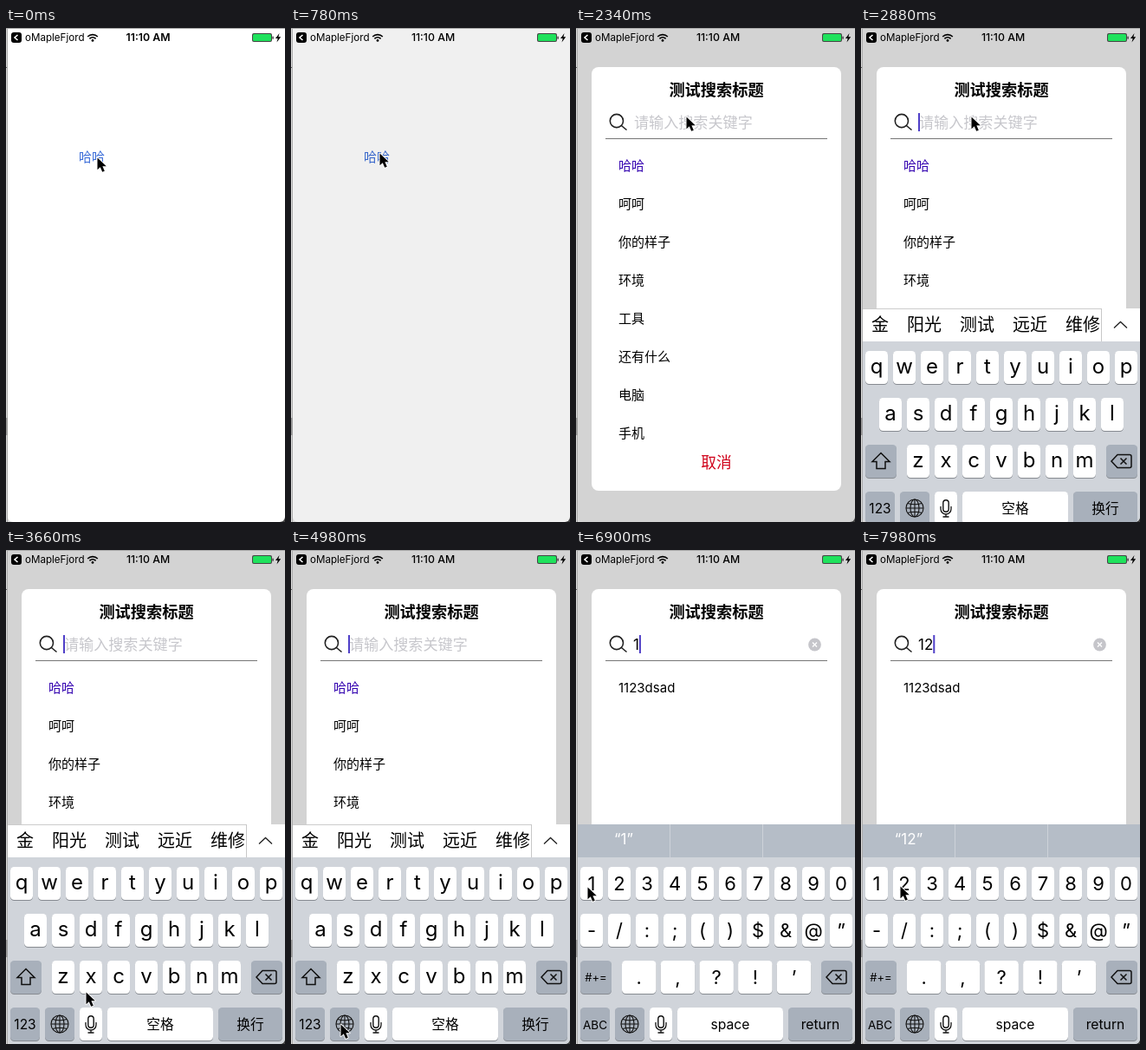
Animation of 322 by 569 pixels, one loop 8000 ms. Source, as an HTML page with a canvas:

```html
<!DOCTYPE html>
<html lang="zh">
<head>
<meta charset="utf-8">
<style>
  html, body { margin: 0; width: 100%; height: 100%; overflow: hidden; }
  canvas { display: block; width: 322px; height: 569px; }
</style>
</head>
<body>
<canvas></canvas>
<script>
const W = 322, H = 569, LOOP = 8000, STEP = 60;
const FONT = 'Inter, "Noto Sans CJK SC", "Noto Sans CJK", sans-serif';
const KEYBOARD_TOP = 316;
const ITEMS = ['哈哈', '呵呵', '你的样子', '环境', '工具', '还有什么', '电脑', '手机'];

// Moments when the state changes, in ms
const OPEN = 780, FOCUS = 2520, ENGLISH = 5040, NUMBERS = 5580, TYPE_1 = 6780, TYPE_2 = 7800;

// Pointer path: time, x, y
const POINTER = [
  [60, 105, 149], [180, 102, 144], [1560, 102, 144], [1920, 146, 243], [2340, 127, 102],
  [3240, 127, 102], [3420, 150, 290], [3660, 92, 509], [4020, 28, 549], [4200, 28, 549],
  [4560, 57, 546], [5100, 57, 546], [5400, 30, 548], [5940, 30, 548], [6600, 13, 388],
  [7440, 13, 388], [7560, 30, 440], [7740, 45, 387]
];

const canvas = document.querySelector('canvas');
const ctx = canvas.getContext('2d');
const ratio = window.devicePixelRatio || 1;
canvas.width = W * ratio;
canvas.height = H * ratio;

const clamp = v => Math.max(0, Math.min(1, v));
const smooth = v => { v = clamp(v); return v * v * (3 - 2 * v); };

function rect(x, y, w, h, color, radius = 0) {
  ctx.fillStyle = color;
  ctx.beginPath();
  ctx.roundRect(x, y, w, h, radius);
  ctx.fill();
}

function text(str, x, y, size, color = '#000', align = 'left', weight = 400) {
  ctx.font = `${weight} ${size}px ${FONT}`;
  ctx.fillStyle = color;
  ctx.textAlign = align;
  ctx.fillText(str, x, y);
}

function stroke(path, color = '#111', width = 1.5) {
  ctx.strokeStyle = color;
  ctx.lineWidth = width;
  ctx.stroke(new Path2D(path));
}

function disc(x, y, r, color) {
  ctx.fillStyle = color;
  ctx.beginPath();
  ctx.arc(x, y, r, 0, 7);
  ctx.fill();
}

function at(x, y, draw, scaleY = 1) {
  ctx.save();
  ctx.translate(x, y);
  ctx.scale(1, scaleY);
  draw();
  ctx.restore();
}

function drawStatusBar(dimmed) {
  rect(6, 5, 12, 12, '#000', 3);
  stroke('M13.5 8 L10 11 L13.5 14', '#fff', 1.6);
  text('oMapleFjord', 22, 15.3, 11.6);
  at(100, 15, () => {
    stroke('M-5.8 -5 A8.3 8.3 0 0 1 5.8 -5', '#000', 1.7);
    stroke('M-3.6 -2.7 A5.2 5.2 0 0 1 3.6 -2.7', '#000', 1.7);
    disc(0, -.6, 1.4, '#000');
  });
  text('11:10 AM', 164, 15.4, 12.3, '#000', 'center', dimmed ? 500 : 600);
  rect(284, 6, 23, 10, '#444', 2);
  rect(285, 7, 21, 8, '#1fe25c', 1.5);
  rect(307.4, 9.5, 1.4, 3.5, '#444', 1);
  ctx.fillStyle = '#000';
  ctx.fill(new Path2D('M315.5 6 L311 12 H313.7 L312.5 16.5 L317.2 10.3 H314.4 Z'));
}

function drawPanel(t, typed) {
  rect(18, -488, 288, 488, '#fff', 8);
  text('测试搜索标题', 162, -455, 18.2, '#000', 'center', 700);
  stroke('M54.5 -426 A7.6 7.6 0 1 1 39.3 -426 A7.6 7.6 0 1 1 54.5 -426 M52.5 -420.5 L58.5 -415.5', '#222', 1.6);
  if (typed) {
    text(typed, 66, -418, 17);
    disc(275.5, -424, 7.4, '#c5c5ca');
    stroke('M273 -426.5 l5 5 m0 -5 l-5 5', '#fff', 1.4);
  } else {
    text('请输入搜索关键字', 67, -418.5, 17.1, '#c7c7cc');
  }
  const typing = t >= TYPE_1 && t < TYPE_1 + 420 || t >= TYPE_2;
  if (t >= FOCUS && (typing || (t - FOCUS) % 1000 < 500)) {
    ctx.font = `17px ${FONT}`;
    rect(66 + ctx.measureText(typed).width, -435, 2, 21, '#4f3fc8');
  }
  rect(34, -406, 256, 1, '#777');

  const rows = typed ? ['1123dsad'] : ITEMS;
  rows.forEach((row, i) =>
    text(row, 49, -369.5 + 44 * i, 15, i || typed ? '#000' : '#3300b0'));
  text('取消', 162, -26.5, 17.7, '#d0021b', 'center');
}

function key(label, x, y, w, size = 22, dark = false, baseline = 27) {
  rect(x, y + 1, w, 38, '#878b91', 4.5);
  rect(x, y, w, 38, dark ? '#a8b0bb' : '#fff', 4.5);
  text(label, x + w / 2, y + baseline, size, '#000', 'center');
}

function drawCandidates(english, typed) {
  if (!english) {
    rect(2, 0, 320, 38, '#fff');
    rect(2, 0, 320, 1, '#ccc');
    [['金', 12], ['阳光', 53], ['测试', 114], ['远近', 175], ['维修', 236]]
      .forEach(([word, x]) => text(word, x, 25.5, 20));
    rect(277, 0, 45, 38, '#fff');
    rect(277, 0, 1, 38, '#c8c8c8');
    stroke('M292 22.5 L299.5 15.5 L307 22.5', '#222', 1.3);
    return;
  }
  rect(2, 0, 320, 38, '#b5bdc7');
  rect(108, 0, 1, 38, '#cdd2d9');
  rect(215, 0, 1, 38, '#cdd2d9');
  const words = typed ? [`“${typed}”`] : ['I', 'The', 'I\'m'];
  words.forEach((word, i) => text(word, 55 + 107 * i, 23.3, 17, '#fff', 'center'));
}

function drawShift(active) {
  at(23, 176, () => {
    const arrow = 'M0 -9.5 L10 .5 H5 V8.5 H-5 V.5 H-10 Z';
    if (active) ctx.fill(new Path2D(arrow));
    stroke(arrow);
  });
}

function drawKeyboard(t, typed) {
  const english = t >= ENGLISH, numbers = t >= NUMBERS;
  const rows = numbers ? ['1234567890', '-/:;()$&@”', '.,?!’']
    : ['qwertyuiop', 'asdfghjkl', 'zxcvbnm'].map(r => english ? r.toUpperCase() : r);
  const size = english ? 22 : 24;
  const baseline = english ? 27 : 26;
  const letter = (c, x, y, w = 26) => key(c, x, y, w, size, false, baseline);

  rect(2, 0, 320, 260, '#d0d4da');
  drawCandidates(english, typed);
  [...rows[0]].forEach((c, i) => letter(c, 5 + 32 * i, 49));
  [...rows[1]].forEach((c, i) => letter(c, (numbers ? 5 : 21) + 32 * i, 103));
  [...rows[2]].forEach((c, i) => numbers
    ? letter(c, 53 + 44.7 * i, 157, 39.5)
    : letter(c, 53 + 32 * i, 157));

  key(numbers ? '#+=' : '', 5, 157, 36, 13, !english || numbers, 24);
  if (!numbers) drawShift(english);
  key('', 283, 157, 36, 16, true);
  at(301, 176, () => {
    stroke('M-12 0 L-5 -7.5 H9 Q11 -7.5 11 -5.5 V5.5 Q11 7.5 9 7.5 H-5 Z');
    stroke('M-1.5 -3.5 l7 7 m0 -7 l-7 7');
  });

  key(numbers ? 'ABC' : '123', 5, 211, 34, numbers ? 13.5 : 15.5, true, 25);
  key('', 45, 211, 34, 16, true);
  at(62, 230, () => {
    stroke('M10 0 A10 10 0 1 1 -10 0 A10 10 0 1 1 10 0', '#111', 1.1);
    stroke('M5 0 A5 10 0 1 1 -5 0 A5 10 0 1 1 5 0', '#111', 1.1);
    stroke('M0 -10 V10 M-10 0 H10 M-8 -5.5 Q0 -3 8 -5.5 M-8 5.5 Q0 3 8 5.5', '#111', 1.1);
  });
  key('', 85, 211, 26);
  at(98, 230, () => {
    stroke('M-3.2 -6 A3.2 3.2 0 0 1 3.2 -6 V1 A3.2 3.2 0 0 1 -3.2 1 Z', '#111', 1.4);
    stroke('M-6 -2 V1 A6 6 0 0 0 6 1 V-2 M0 7 V10 M-3.5 10 H3.5', '#111', 1.3);
  });
  key(english ? 'space' : '空格', 117, 211, 122, 15.7, false, 24.5);
  key(english ? 'return' : '换行', 245, 211, 74, 15.7, true, 24.5);
}

function drawPointer(t) {
  let [, x, y] = POINTER[0];
  for (let i = 1; i < POINTER.length; i++) {
    const [t0, x0, y0] = POINTER[i - 1], [t1, x1, y1] = POINTER[i];
    if (t < t0) break;
    const p = smooth((t - t0) / (t1 - t0));
    x = x0 + (x1 - x0) * p;
    y = y0 + (y1 - y0) * p;
  }
  at(x, y, () => {
    const arrow = new Path2D('M.5 .5 V14.2 L3.8 11.2 L6.2 16.8 L8.8 15.7 L6.4 10.3 H10.8 Z');
    ctx.lineJoin = 'round';
    ctx.strokeStyle = '#fff';
    ctx.lineWidth = 1.8;
    ctx.stroke(arrow);
    ctx.fillStyle = '#000';
    ctx.fill(arrow);
    ctx.lineJoin = 'miter';
  });
}

function drawFrame(t) {
  const typed = t >= TYPE_2 ? '12' : t >= TYPE_1 ? '1' : '';
  const dim = clamp((t - OPEN + STEP) / 180);
  const grow = smooth((t - OPEN) / 482);

  ctx.setTransform(ratio, 0, 0, ratio, 0, 0);
  rect(0, 0, W, H, '#d8d8d8');
  rect(0, 0, W, 1, '#aaa');
  rect(1, 0, 1, H, '#aaa');
  rect(0, 45, 1, 1, '#555');
  rect(0, 449, 2, 20, '#999');
  rect(312, 559, 10, 10, '#444');

  ctx.save();
  ctx.beginPath();
  ctx.roundRect(2, 1, 320, 568, [0, 0, 6, 6]);
  ctx.clip();
  rect(2, 1, 320, 568, '#fff');
  text('哈哈', 84, 153.5, 15, '#3a6cd8');
  if (t >= OPEN) rect(2, 1, 320, 568, `rgba(0,0,0,${.172 * dim})`);
  drawStatusBar(t >= OPEN);
  if (grow > 0) at(0, 533, () => drawPanel(t, typed), grow);
  if (t >= FOCUS) {
    const decay = 15.1 * (t - FOCUS) / 1000;
    const offset = (H - KEYBOARD_TOP) * (1 + decay) * Math.exp(-decay);
    at(0, KEYBOARD_TOP + Math.round(offset), () => drawKeyboard(t, typed));
  }
  ctx.restore();
  drawPointer(t);
}

function tick() {
  const t = performance.now() % LOOP;
  drawFrame(Math.floor(t / STEP) * STEP);
  requestAnimationFrame(tick);
}
tick();
</script>
</body>
</html>
```
